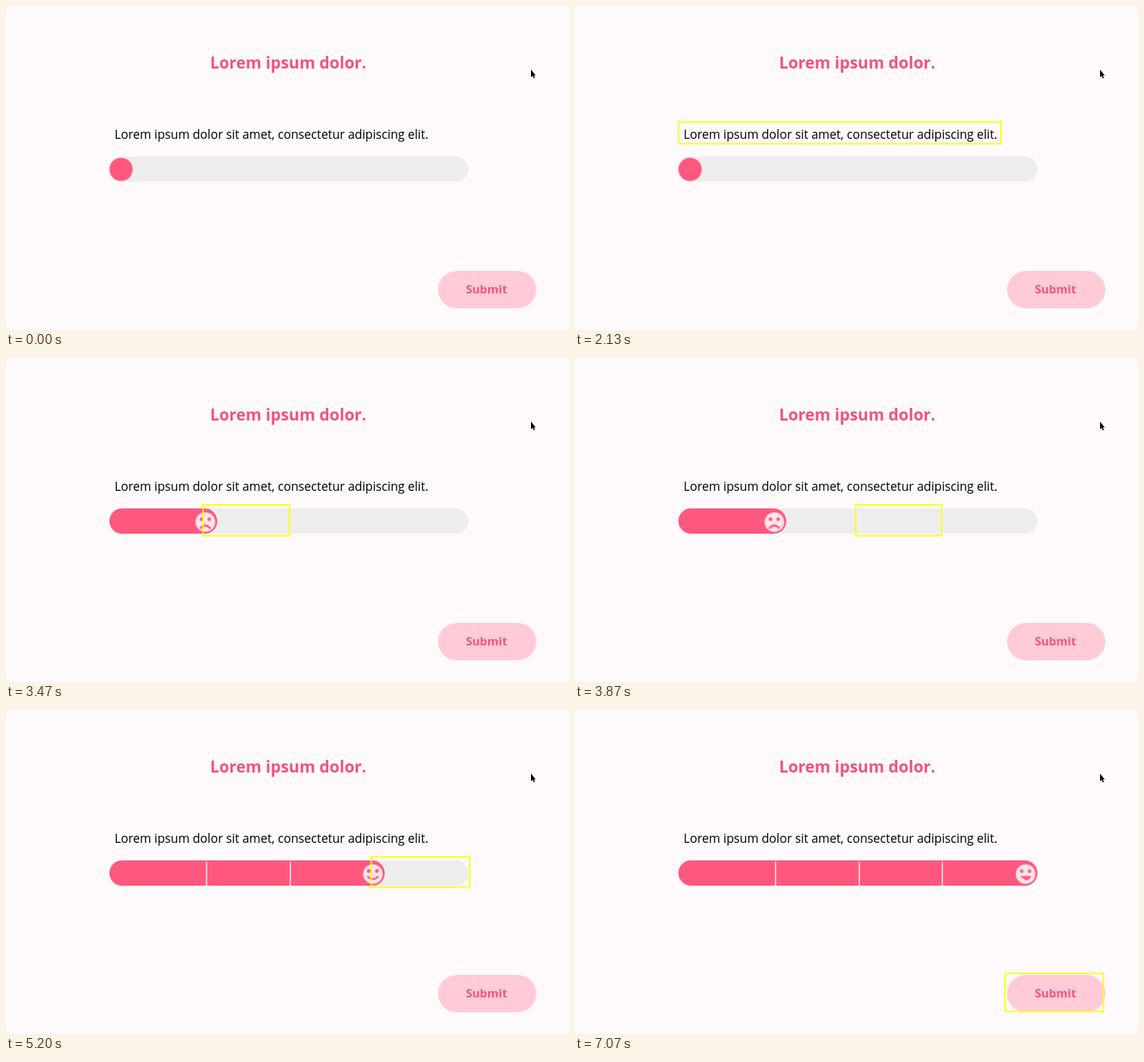
An HTML page for the animation above (8000 ms loop, 800 by 461 pixels).

```html
<!DOCTYPE html>
<html lang="en">
<head>
<meta charset="utf-8">
<title>Slider form</title>
<style>
  :root { --pink: #ff587e; --ink: #f3547d; --loop: 8s infinite; }
  html, body { margin: 0; width: 100%; height: 100%; overflow: hidden; }
  body { position: relative; background: #fef9fb; }
  body > * { position: absolute; box-sizing: border-box; }
  svg { left: 0; top: 0; width: 800px; height: 461px; }
  text { font-family: "Open Sans", sans-serif; }
  .bold { font-weight: 700; fill: var(--ink); }

  .track, .fill { left: 147px; height: 36px; border-radius: 18px; }
  .track { top: 214px; width: 510px; background: #eeedee; }
  .fill {
    --line: linear-gradient(#ffd3dd, #ffd3dd);
    top: 213.5px;
    background:
      var(--line) 137px 2px / 2px 34px no-repeat,
      var(--line) 256px 2px / 2px 34px no-repeat,
      var(--line) 374px 2px / 2px 34px no-repeat,
      var(--pink);
    animation: fill var(--loop);
  }
  .thumb { fill: var(--pink); animation: slide var(--loop); }
  .face { opacity: 0; animation: var(--loop) step-end; }
  .face > circle:first-child { fill: #ffe4ea; }
  .mouth { fill: none; stroke: var(--pink); stroke-width: 2.6; }
  .sad { animation-name: sad; }
  .happy { animation-name: happy; }
  .glad { animation-name: glad; }
  .focus { border: 2px solid #ffff14; animation: focus var(--loop) step-end; }

  @keyframes fill {
    0%, 37.4% { width: 0; }
    40%, 55.25% { width: 153px; }
    57.4%, 67.9% { width: 391px; }
    71%, 100% { width: 510px; }
  }
  @keyframes slide {
    0%, 37.4% { transform: translate(163.5px, 232.5px); }
    40%, 55.25% { transform: translate(283.3px, 232.8px); }
    57.4%, 67.9% { transform: translate(521.3px, 232.8px); }
    71%, 100% { transform: translate(640.3px, 232.8px); }
  }
  @keyframes sad { 37.4% { opacity: 1; } 55.25% { opacity: 0; } }
  @keyframes happy { 55.25% { opacity: 1; } 67.9% { opacity: 0; } }
  @keyframes glad { 67.9%, 100% { opacity: 1; } }
  @keyframes focus {
    0% { visibility: hidden; left: 281px; top: 59px; width: 236px; height: 40px; }
    9.95% { visibility: visible; left: 281px; top: 59px; width: 236px; height: 40px; }
    15% { left: 146px; top: 164px; width: 460px; height: 33px; }
    27.5% { left: 144px; top: 209px; width: 140px; height: 45px; }
    43.3% { left: 279px; top: 208px; width: 125px; height: 46px; }
    46.6% { left: 398px; top: 208px; width: 124px; height: 46px; }
    60% { left: 518px; top: 208px; width: 142px; height: 45px; }
    78.3% { left: 134px; top: 207px; width: 526px; height: 46px; }
    82.45%, 100% { visibility: visible; left: 610px; top: 374px; width: 142px; height: 56px; }
  }
</style>
</head>
<body>
  <div class="track"></div>
  <div class="fill"></div>
  <svg viewBox="0 0 800 461">
    <text class="bold" x="290" y="88.5" font-size="22.9">Lorem ipsum dolor.</text>
    <text x="154.3" y="188.7" font-size="17.32">Lorem ipsum dolor sit amet, consectetur adipiscing elit.</text>

    <g class="thumb">
      <circle r="16.6"/>
      <g class="face sad">
        <circle cy=".7" r="13.9"/>
        <circle cx="-5.5" cy="-3.6" r="2.5"/>
        <circle cx="5.5" cy="-3.6" r="2.5"/>
        <path class="mouth" d="M-7.4 9.6Q0 1.6 7.4 9.6"/>
      </g>
      <g class="face happy">
        <circle cy=".7" r="13.9"/>
        <circle cx="-5.8" cy="-3.8" r="2.6"/>
        <circle cx="5.8" cy="-3.8" r="2.6"/>
        <path class="mouth" d="M-7.8 3.6Q0 12 7.8 3.6"/>
      </g>
      <g class="face glad">
        <circle cy=".7" r="13.9"/>
        <circle cx="-5.5" cy="-3.6" r="2.5"/>
        <circle cx="5.5" cy="-3.6" r="2.5"/>
        <path d="M-8 3.6H8Q5.2 9.6 0 9.6T-8 3.6Q-5.2 9.6 0 9.6"/>
      </g>
    </g>

    <rect x="614" y="377" width="139.5" height="53" rx="26.5" fill="#ffcbd7"/>
    <text class="bold" x="653.4" y="409" font-size="16.5">Submit</text>
    <path d="M746 90.5V101.5L748.3 99.3L750 103L751.6 102.3L750 98.7H752.8Z"
          stroke="#fff" stroke-width="1.2" paint-order="stroke"/>
  </svg>
  <div class="focus"></div>
</body>
</html>
```
